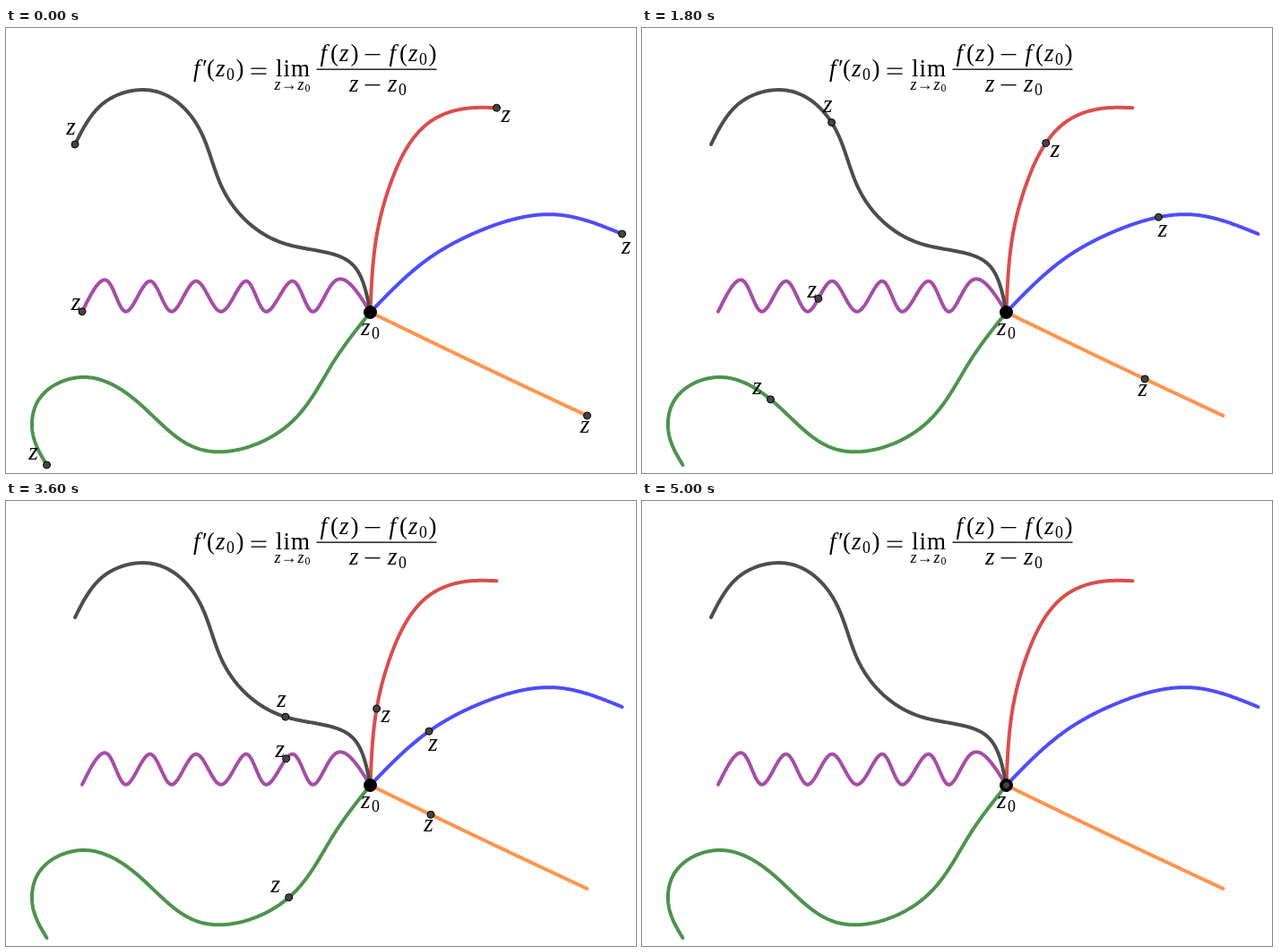
Recreate the animation shown at these times as an HTML page with a canvas. Size 703 by 497 pixels, loop 5.1 s.

```html
<!DOCTYPE html>
<html lang="en">
<head>
<meta charset="utf-8">
<title>Paths to a complex limit</title>
<style>
  html, body { margin: 0; width: 100%; height: 100%; overflow: hidden; background: #fff; }
  canvas { display: block; }
</style>
</head>
<body>
<canvas id="stage" width="703" height="497"></canvas>
<script>
const ctx = document.getElementById('stage').getContext('2d');
const STEP = 100, STEPS = 50;
const Z0 = [406.5, 317.5];

// The wave alternates between trough and peak at these x positions.
const wave = [85, 113.5, 134, 161, 184.5, 212, 240, 268.5, 290, 320, 341.5, 367]
  .map((x, i) => [x, i % 2 ? 282.7 : 316.7]);

// Colour, offset from the dot to the centre of its "z", and key points on the way to Z0.
const curves = [
  makeCurve('#ff944d', [-3, 13], [[648.5, 433], [522.3, 373.5]]),
  makeCurve('#4d934d', [-15.5, -11.5], [[45.5, 488], [30.5, 456], [36, 416], [85, 390],
    [145.5, 416.5], [215, 470], [316, 442.5], [367, 370.5]]),
  makeCurve('#a64da6', [-7.5, -7.5], wave),
  makeCurve('#4d4dff', [4, 16], [[687.5, 230], [615, 208.5], [528, 226.8], [472, 257.2]]),
  makeCurve('#db4d4d', [9.7, 9.5], [[547.5, 89.2], [512, 90], [476.5, 102.5], [429.3, 173],
    [413.5, 232.5]]),
  makeCurve('#4d4d4d', [-5, -17], [[77, 130], [110, 83], [168, 71], [212.5, 107], [242, 180],
    [311.5, 241], [386.5, 264]])
];

// Natural cubic spline through (ts[i], ys[i]).
function spline(ts, ys) {
  const n = ts.length - 1;
  const [c, d, m] = [0, 0, 0].map(() => Array(n + 1).fill(0));
  for (let i = 1; i < n; i++) {
    const h0 = ts[i] - ts[i - 1], h1 = ts[i + 1] - ts[i];
    const pivot = 2 * (h0 + h1) - h0 * c[i - 1];
    const bend = 6 * ((ys[i + 1] - ys[i]) / h1 - (ys[i] - ys[i - 1]) / h0);
    c[i] = h1 / pivot;
    d[i] = (bend - h0 * d[i - 1]) / pivot;
  }
  for (let i = n - 1; i > 0; i--) m[i] = d[i] - c[i] * m[i + 1];
  return t => {
    let i = 0;
    while (i < n - 1 && t > ts[i + 1]) i++;
    const h = ts[i + 1] - ts[i], a = ts[i + 1] - t, b = t - ts[i];
    return (m[i] * a ** 3 + m[i + 1] * b ** 3) / (6 * h)
      + (ys[i] / h - m[i] * h / 6) * a + (ys[i + 1] / h - m[i + 1] * h / 6) * b;
  };
}

function makeCurve(color, label, keys) {
  const points = [...keys, Z0];
  const ts = [0];
  for (let i = 1; i < points.length; i++) {
    const [x0, y0] = points[i - 1], [x1, y1] = points[i];
    ts.push(ts[i - 1] + Math.hypot(x1 - x0, y1 - y0));
  }
  const x = spline(ts, points.map(p => p[0])), y = spline(ts, points.map(p => p[1]));
  const samples = Array.from({ length: 401 }, (_, i) => i / 400 * ts.at(-1));
  const d = 'M' + samples.map(t => `${x(t).toFixed(3)} ${y(t).toFixed(3)}`).join('L');
  const track = document.createElementNS('http://www.w3.org/2000/svg', 'path');
  track.setAttribute('d', d);
  const length = track.getTotalLength();
  return { color, label, path: new Path2D(d), at: t => track.getPointAtLength(t * length) };
}

function write(text, x, y, size = 27, style = '') {
  ctx.font = `${style} ${size}px "Liberation Serif", serif`;
  ctx.fillStyle = '#000';
  ctx.fillText(text, x, y);
}
const italic = (text, x, y, size = 27) => write(text, x, y, size, 'italic');
const bar = (x, y, width = 17) => ctx.fillRect(x, y, width, 1.3);

function zNought(x, y, size = 27) {
  italic('z', x, y, size);
  write('0', x + size * 0.44, y + size * 0.15, size * 0.66);
}

function argument(x, y, z, width) {
  write('(', x, y);
  z('z', x + 10, y);
  write(')', x + width, y);
}
const ofZ = (x, y) => argument(x, y, italic, 22.5);
const ofZNought = (x, y) => argument(x, y, (_, zx, zy) => zNought(zx, zy), 32.5);

function formula() {
  italic('f', 209, 53.5);
  write('′', 219, 53.5);
  ofZNought(224, 53.5);
  bar(273.5, 44.5);
  bar(273.5, 50.5);
  ctx.letterSpacing = '1px';
  write('lim', 301, 53.5);
  ctx.letterSpacing = '0px';
  italic('z', 299.5, 68.5, 18);
  write('→', 306.5, 68.5, 18);
  zNought(325.5, 68.5, 18);

  italic('f', 350.5, 37);
  ofZ(362, 37);
  bar(400.5, 29);
  italic('f', 427.5, 37);
  ofZNought(439, 37);
  bar(346.5, 45.5, 134);
  italic('z', 383, 71);
  bar(400.5, 63);
  zNought(426, 71);
}

function dot(x, y, radius, fill) {
  ctx.beginPath();
  ctx.arc(x, y, radius, 0, 2 * Math.PI);
  ctx.fillStyle = fill;
  ctx.fill();
  ctx.lineWidth = 1;
  ctx.strokeStyle = '#000';
  ctx.stroke();
}

function draw(t) {
  ctx.clearRect(0, 0, 703, 497);
  ctx.lineCap = ctx.lineJoin = 'round';
  for (const { color, path } of curves) {
    ctx.lineWidth = 4;
    ctx.strokeStyle = color;
    ctx.stroke(path);
  }
  formula();
  dot(...Z0, 7, '#000');
  zNought(396, 343);
  for (const { at, label: [dx, dy] } of curves) {
    const { x, y } = at(t);
    dot(x, y, 4, '#444');
    if (t < 1) italic('z', x + dx - 4.7, y + dy + 5.8);
  }
}

const start = performance.now();
function tick(now) {
  const step = Math.floor(Math.max(0, now - start) / STEP) % (STEPS + 1);
  draw(step / STEPS);
  requestAnimationFrame(tick);
}
draw(0);
requestAnimationFrame(tick);
</script>
</body>
</html>
```
